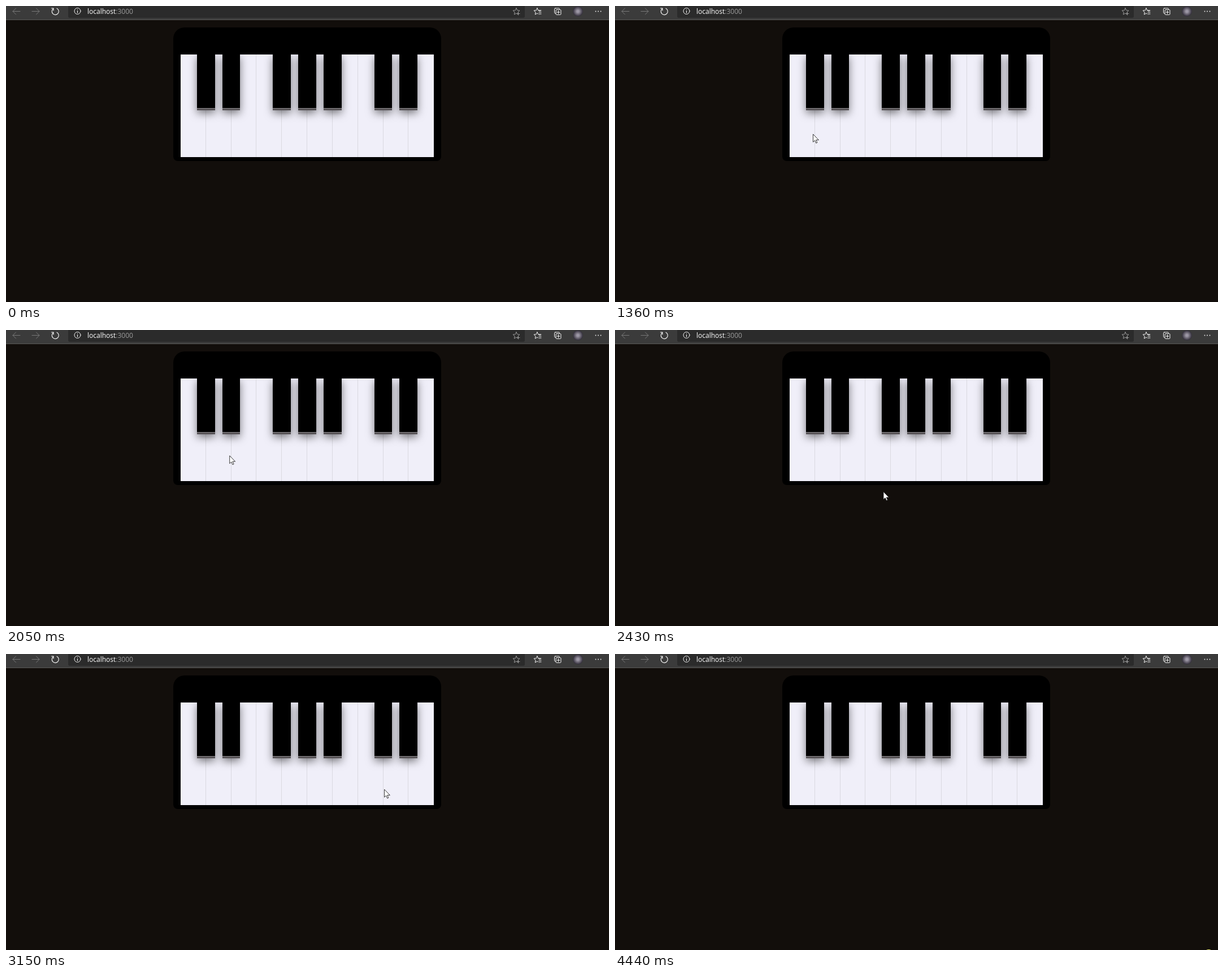
An HTML page that plays this animation: 1067 by 525 pixels, repeating every 4.54 s.

```html
<!DOCTYPE html>
<html lang="en">
<head>
<meta charset="utf-8">
<title>Piano</title>
<style>
  html, body { margin: 0; width: 100%; height: 100%; overflow: hidden; background: #120e0b; }
  body > svg { position: absolute; left: 0; top: 0; z-index: 3; }
  text { font: 12px "Open Sans", "Noto Sans", sans-serif; }
  #piano { position: absolute; left: 296px; top: 38px; width: 474px; height: 237px;
    background: #000; border-radius: 20px 20px 8px 8px; }
  #piano div { position: absolute; top: 48px; box-sizing: border-box; }
  .white { width: 44.82px; height: 182px; background: #f0eff9; }
  .white:not(:nth-child(10)) { border-right: 1px solid #dad9e1; }
  #piano .black { width: 31.7px; height: 99px; z-index: 2; background: #000;
    border-bottom: 3px solid #575356; box-shadow: 0 5px 15px rgba(0, 0, 0, .5); }
  .black::after { content: ""; position: absolute; left: 0; right: 0; bottom: 0; height: 1px; background: #8b888c; }
</style>
</head>
<body>
<div id="piano"></div>
<svg width="1067" height="525" fill="none" stroke="#f2f2f2" stroke-linecap="round" stroke-linejoin="round">
  <defs>
    <radialGradient id="avatar">
      <stop offset=".2" stop-color="#9d98a6"/><stop offset="1" stop-color="#302c38"/>
    </radialGradient>
    <path id="arrow" d="M-6.500 0H6.500M1 -5.500 6.500 0 1 5.500"/>
    <polygon id="star"/>
  </defs>
  <g stroke="none">
    <rect width="1067" height="24" fill="#3b3b3b"/>
    <rect y="24" width="1067" height="1" fill="#595856"/>
    <rect x="110" y="-5" width="808" height="26" rx="3" fill="#2b2b2b"/>
    <text x="144" y="14" fill="#fff">localhost<tspan fill="#9b9b9b">:3000</tspan></text>
    <circle cx="1012" cy="9.5" r="9" fill="url(#avatar)"/>
  </g>
  <g stroke="#777">
    <use href="#arrow" transform="translate(18.5 9.5) scale(-1 1)"/>
    <use href="#arrow" x="52.5" y="9.5"/>
  </g>
  <path d="M84 4.500A6 6 0 1 0 90 4.200M84 8V4H80.500" stroke-width="1.200"/>
  <circle cx="126.500" cy="9" r="5.500"/>
  <path d="M126.500 8.500v3.500M126.500 6v.2" stroke-width="1.200"/>
  <g stroke="#999">
    <use href="#star" x="903" y="10"/>
    <path d="M904 13.500h5m-2.500-2.500v5"/>
  </g>
  <use href="#star" x="940" y="10"/>
  <path d="M943 11h4m-4 3h4" stroke="#3b3b3b" stroke-width="3"/>
  <path d="M942 8h5m-4 3h4m-4 3h4"/>
  <rect x="970.500" y="4" width="9" height="9" rx="1.500"/>
  <rect x="973" y="6.500" width="9" height="9" rx="1.500" fill="#3b3b3b"/>
  <path d="M977.500 8.500v5m-2.500-2.500h5"/>
  <path d="M1043.500 9.500H1054" stroke-width="1.800" stroke-dasharray="0 4.500"/>
  <g id="pointer">
    <circle id="halo" cx="-.5" cy="-.5" r="9.500" fill="#f5f56f" stroke="none"/>
    <path d="M0 0V13.500L3.100 10.700 5.300 15.500 7.400 14.500 5.200 9.900H9.500z" fill="#fff" stroke="#222" stroke-width=".9"/>
  </g>
</svg>
<script>
const LOOP = 4540, START = 115, TICK = 77;
const KEYS_LEFT = 309, KEY = 44.82, HOLD = 2, RELEASE = 2;
const [piano, pointer, halo, star] = ['piano', 'pointer', 'halo', 'star'].map(id => document.getElementById(id));

function addKey(type, left) {
  const key = document.createElement('div');
  key.className = type;
  key.style.left = left + 'px';
  return piano.appendChild(key);
}
const whites = Array.from({ length: 10 }, (_, i) => addKey('white', 13 + i * KEY));
// An octave has no black key at its first and fourth boundary
whites.forEach((_, i) => i % 7 % 3 || i % 7 === 6 ? addKey('black', 13 + i * KEY - 16) : null);

star.setAttribute('points', Array.from({ length: 10 }, (_, i) => {
  const angle = i * Math.PI / 5, radius = i % 2 ? 3 : 6.3;
  return [radius * Math.sin(angle), -radius * Math.cos(angle)];
}).join(' '));

const linear = u => u;
const easeIn = u => u * u;
const easeOut = u => 1 - (1 - u) ** 6;

// The pointer reaches each stop at tick `at` after `travel` ticks
const stops = [
  { x: 861, y: 475, at: 0, travel: 0, ease: linear },
  { x: 344, y: 234, at: 10, travel: 10, ease: easeOut, click: true },
  { x: 370, y: 209, at: 19, travel: 4, ease: linear, click: true },
  { x: 510, y: 287, at: 29, travel: 7, ease: easeIn },
  { x: 475, y: 287, at: 30, travel: 1, ease: linear },
  { x: 428, y: 248, at: 33, travel: 3, ease: linear, click: true },
  { x: 750, y: 238, at: 40, travel: 4, ease: linear, click: true },
  { x: 1020, y: 806, at: 49, travel: 3, ease: easeIn },
  { x: 1051, y: 534, at: 55, travel: 0, ease: linear, click: true }
];
const clicks = stops.filter(stop => stop.click);

function pointerAt(tick) {
  let { x, y } = stops[0];
  for (const stop of stops) {
    const begin = stop.at - stop.travel;
    if (tick < begin) break;
    const u = stop.ease(Math.min(1, (tick - begin) / (stop.travel || 1)));
    const part = stop.travel ? u : 1;
    x += (stop.x - x) * part;
    y += (stop.y - y) * part;
  }
  return [x, y];
}

function drawKey(key, held, release) {
  const { style } = key;
  style.zIndex = held || release ? 1 : 0;
  style.background = held ? '#eeeef2' : '';
  style.transform = `scale(1, ${1 - .015 * release})`;
  style.boxShadow = held ? 'inset 0 0 12px rgba(0, 0, 0, .85)' : `0 0 14px rgba(0, 0, 0, ${release})`;
}

function draw(time) {
  const t = time % LOOP;
  // The screen refreshes in even ticks
  const tick = Math.floor((t - START) / TICK);
  let clicking = false;

  for (const { x, at } of clicks) {
    const age = tick - at - 1;
    const held = age >= 0 && age < HOLD;
    const release = age >= HOLD ? Math.max(0, 1 - (age - HOLD) / RELEASE) : 0;
    const key = whites[Math.floor((x - KEYS_LEFT) / KEY)];
    if (key) drawKey(key, held, release);
    clicking ||= held;
  }

  pointer.setAttribute('transform', `translate(${pointerAt(tick)})`);
  pointer.style.display = tick < 0 ? 'none' : '';
  halo.style.display = clicking ? '' : 'none';
}

function frame() {
  draw(performance.now());
  requestAnimationFrame(frame);
}
frame();
</script>
</body>
</html>
```
